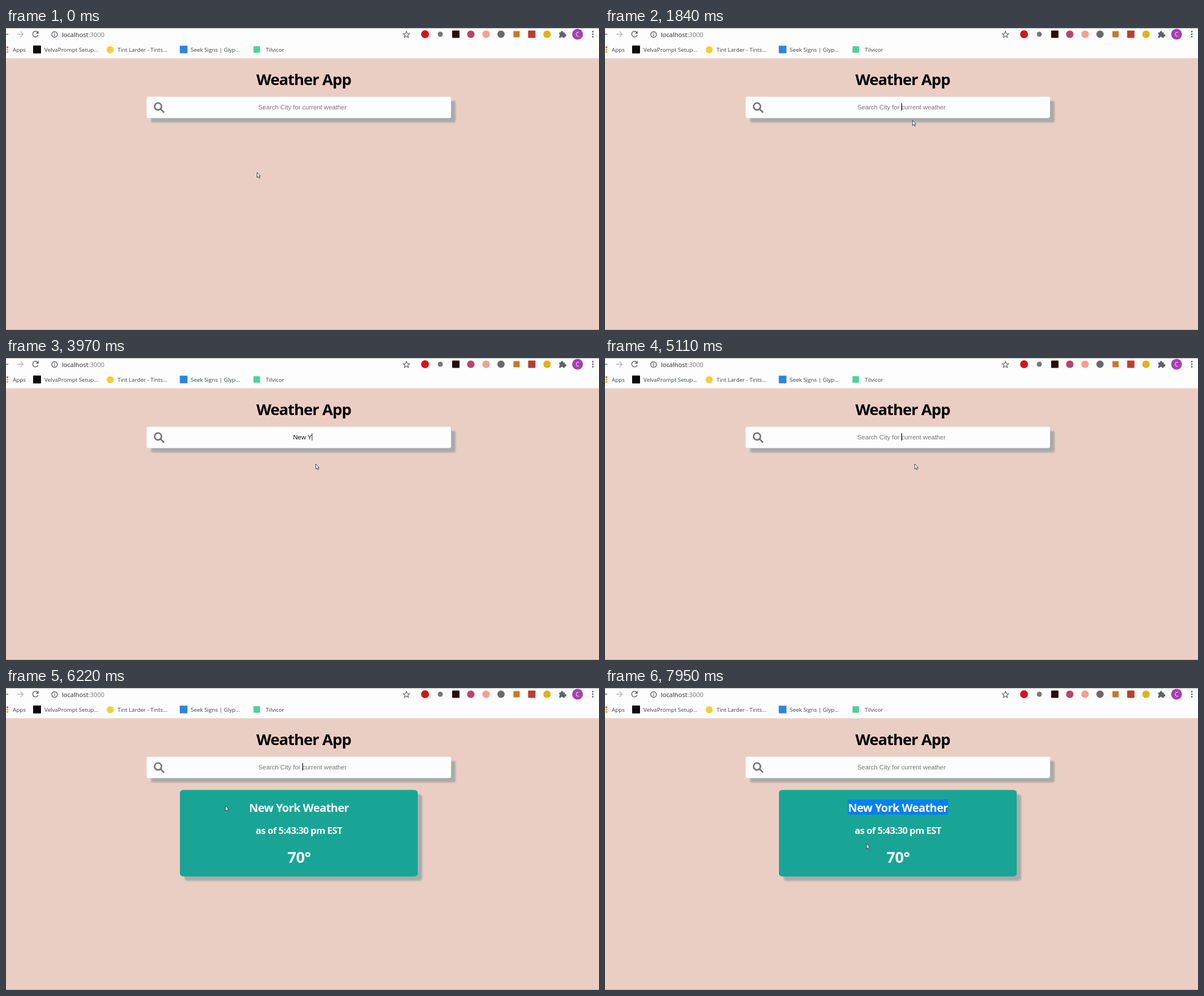
Write an HTML page that moves like this. It is 1050 px wide and 534 px high and loops after 8 s.

```html
<!DOCTYPE html>
<html lang="en">
<head>
<meta charset="utf-8">
<title>Weather App</title>
<style>
  html, body { margin: 0; width: 100%; height: 100%; overflow: hidden; background: #ebcec3; }
  svg { display: block; width: 1050px; height: 534px; }
  .ui { font-family: "Open Sans", "Noto Sans", sans-serif; }
  .bar { font-size: 9.85px; fill: #3c4043; }
  .url { font-size: 11.4px; letter-spacing: -.01em; fill: #2b2d30; }
  .bold { font-weight: 700; letter-spacing: -.036em; text-anchor: middle; }
  .field { font: 11.3px "Liberation Sans", Arial, sans-serif; text-anchor: middle; white-space: pre; }
  .line { fill: none; stroke: #5f6368; stroke-width: 1.4; }
</style>
</head>
<body>
<svg viewBox="0 0 1050 534">
  <defs>
    <filter id="soft" x="-5%" y="-20%" width="110%" height="140%"><feGaussianBlur stdDeviation="1.6"/></filter>
  </defs>
  <rect width="1050" height="534" fill="#ebcec3"/>
  <rect y="533" width="1050" height="1" fill="#b9aba6"/>

  <!-- browser bars -->
  <rect width="1050" height="53.5" fill="#fdfdfd"/>
  <rect width="1050" height="1" fill="#b4b4b4"/>
  <path class="line" d="M0 11H4"/>
  <path class="line" style="stroke:#b5b7ba" d="M20 11H30.5M25.5 6L30.5 11L25.5 16"/>
  <path class="line" d="M56.2 7.6A5 5 0 1 0 57 12.4"/>
  <path d="M57.8 5V10H52.8Z" fill="#5f6368"/>
  <circle class="line" cx="86" cy="11.5" r="5" stroke-width="1.1"/>
  <path class="line" d="M86 10.8V14.2M86 8.4V9.7"/>
  <text class="ui url" x="99" y="15.5">localhost<tspan fill="#75787c">:3000</tspan></text>
  <path class="line" style="stroke-width:1.2" d="M709 6L710.6 9.8L714.7 10.1L711.5 12.8L712.5 16.8L709 14.6L705.5 16.8L706.5 12.8L703.3 10.1L707.4 9.8Z"/>
  <g id="icons"></g>
  <path fill="#5f6368" d="M979.5 8H982.4A2.2 2.2 0 1 1 986.6 8H989.5V11A2.1 2.1 0 1 1 989.5 15V17.2H986.3A2.1 2.1 0 0 0 982.2 17.2H979.5V14.2A2 2 0 0 0 979.5 10.6Z"/>
  <circle cx="1012" cy="11" r="9.6" fill="#a83fb5"/>
  <text class="ui" x="1012" y="14.8" font-size="10" text-anchor="middle" fill="#fff">C</text>
  <g fill="#5f6368"><circle cx="1039" cy="6.5" r="1.4"/><circle cx="1039" cy="11" r="1.4"/><circle cx="1039" cy="15.5" r="1.4"/></g>
  <rect x="1" y="32.5" width="3" height="3" fill="#e8503f"/>
  <rect x="1" y="36.7" width="3" height="3" fill="#f5b51c"/>
  <rect x="1" y="40.9" width="3" height="3" fill="#f0a21a"/>
  <g class="ui bar">
    <text x="12" y="41.5">Apps</text>
    <text x="68" y="41.5">VelvaPrompt Setup...</text>
    <text x="197.5" y="41.5">Tint Larder - Tints...</text>
    <text x="327" y="41.5">Seek Signs | Glyp...</text>
    <text x="460" y="41.5">Tilvicor</text>
  </g>

  <!-- page -->
  <text class="ui bold" x="527" y="101.3" font-size="27.5">Weather App</text>
  <rect x="257" y="129" width="539" height="38" rx="3" fill="#a9abab" filter="url(#soft)"/>
  <rect x="249" y="121.5" width="539" height="37.8" rx="3" fill="#fdfdfd"/>
  <g fill="none" stroke="#757575" stroke-width="2.7">
    <circle cx="269.2" cy="138.7" r="6.1"/>
    <path d="M273.6 143.2L279.2 148.8" stroke-linecap="round"/>
  </g>
  <text id="entry" class="field" x="525" y="144"></text>
  <rect id="caret" y="133" width="1.2" height="13"/>

  <g id="card">
    <rect x="316" y="188" width="421" height="153" rx="5" fill="#a9abab" filter="url(#soft)"/>
    <rect x="308" y="180.3" width="421" height="153" rx="7" ry="4.5" fill="#18a596"/>
    <rect id="mark" y="197" height="27" fill="#0580ee"/>
    <g class="ui bold" fill="#fff">
      <text id="city" x="518.7" y="219.2" font-size="20">New York Weather</text>
      <text x="518.7" y="258" font-size="16.7">as of 5:43:30 pm EST</text>
      <text x="519" y="309" font-size="27.5">70°</text>
    </g>
  </g>

  <path id="arrow" d="M.5 .5V9.3L2.5 7.5L4 10.7L5.5 10L4.1 6.9H6.6Z" fill="#fff" stroke="#333" stroke-width=".9"/>
  <path id="beam" d="M-2 -5.5H2M-2 5.5H2M0 -5.5V5.5" fill="none" stroke="#444" stroke-width=".9"/>
</svg>
<script>
const LOOP = 8000;
const $ = id => document.getElementById(id);

// plain marks: shape, centre x, centre y, half size, colour
const icons = [
  ["circle", 742, 11, 7, "#d3151b"], ["circle", 769, 11, 4.5, "#777"],
  ["rect", 796.5, 11, 6.5, "#2a0b0b"], ["circle", 823, 11, 6.6, "#b8446b"],
  ["circle", 850, 11, 6.6, "#f3a090"], ["circle", 876.5, 11, 6.5, "#6a6a6a"],
  ["rect", 904, 11, 5.5, "#c77728"], ["rect", 931, 11, 6.5, "#b5402f"],
  ["circle", 958, 11, 6.6, "#e3b022"], ["rect", 55, 38, 7, "#0b0b0b"],
  ["circle", 184.5, 38.5, 6.2, "#f2cf3a"], ["rect", 314.5, 38, 6.8, "#2a86de"],
  ["rect", 444, 38, 5.8, "#48d597"]
];
$("icons").innerHTML = icons.map(([kind, x, y, r, fill]) => kind === "circle"
  ? `<circle cx="${x}" cy="${y}" r="${r}" fill="${fill}"/>`
  : `<rect x="${x - r}" y="${y - r}" width="${2 * r}" height="${2 * r}" rx="1" fill="${fill}"/>`).join("");

// time, x, y, pointer shape
const pointer = [
  [0, 444, 255, "arrow"], [500, 446, 248, "arrow"], [620, 453, 226, "arrow"],
  [740, 472, 205, "arrow"], [860, 496, 184, "arrow"], [980, 523, 162, "arrow"],
  [1100, 538, 145, "beam"], [1220, 543, 140, "beam"],
  [1840, 544, 163, "arrow"], [1960, 547, 180, "arrow"], [2080, 548, 187, "arrow"],
  [5620, 536, 190, "arrow"], [5740, 500, 194, "arrow"], [5860, 448, 205, "beam"],
  [5980, 396, 207, "arrow"], [6100, 375, 208, "arrow"], [6220, 388, 208, "arrow"],
  [6340, 412, 208, "arrow"], [6460, 418, 208, "arrow"], [6580, 424, 208, "arrow"],
  [6700, 441, 213, "beam"], [6950, 433, 212, "beam"], [7090, 453, 211, "beam"],
  [7210, 487, 213, "beam"], [7330, 553, 217, "beam"], [7450, 606, 222, "beam"],
  [7950, 462.5, 275, "arrow"]
];
// time, letters typed
const typing = [[0, 0], [2710, 1], [3080, 2], [3200, 3], [3450, 4], [3970, 5],
  [4110, 6], [4490, 7], [4610, 8], [5110, 0]];
// time, caret visible
const blink = [[0, 0], [1470, 1], [1960, 0], [2460, 1], [5620, 0], [6100, 1], [6580, 0]];
// time, letters selected
const selecting = [[0, 0], [7090, 1], [7210, 5], [7330, 11], [7450, 16]];

const at = (steps, t) => steps.findLast(step => step[0] <= t);
const show = (id, on) => $(id).setAttribute("visibility", on ? "inherit" : "hidden");

function draw(t) {
  const letters = at(typing, t)[1];
  const entry = $("entry");
  const value = letters ? "New York".slice(0, letters) : "Search City for current weather";
  if (entry.textContent !== value) entry.textContent = value;
  entry.setAttribute("fill", letters ? "#111" : "#757575");

  const half = letters ? entry.getComputedTextLength() / 2 : 0;
  $("caret").setAttribute("x", 524.8 + half);
  $("caret").setAttribute("fill", letters ? "#444" : "#000");
  show("caret", at(blink, t)[1]);

  show("card", t >= 5230);
  const count = at(selecting, t)[1];
  const city = $("city");
  $("mark").setAttribute("x", city.getStartPositionOfChar(0).x - .3);
  $("mark").setAttribute("width", count ? city.getSubStringLength(0, count) + .6 : 0);

  const [, x, y, shape] = at(pointer, t);
  for (const id of ["arrow", "beam"]) {
    show(id, id === shape);
    $(id).setAttribute("transform", `translate(${x} ${y})`);
  }
}

const start = performance.now();
function tick() {
  draw((performance.now() - start) % LOOP);
  requestAnimationFrame(tick);
}
tick();
</script>
</body>
</html>
```
